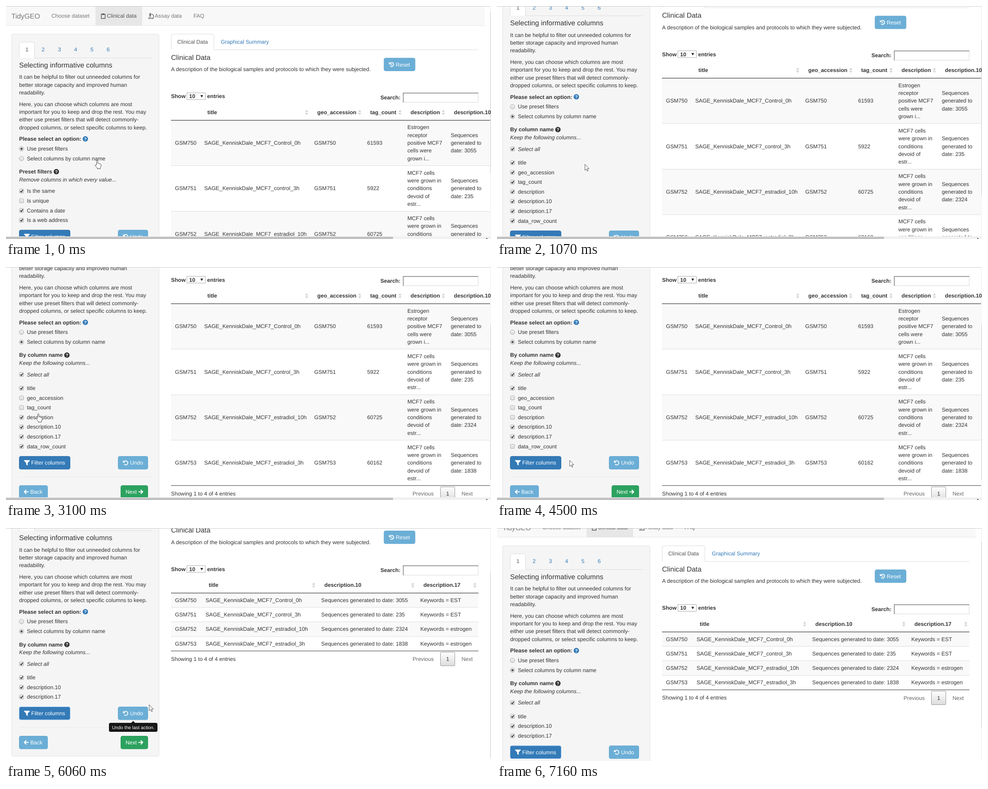
An HTML page that plays this animation: 1079x519 px, repeating every 7310 ms.

```html
<!DOCTYPE html>
<html lang="en">
<head>
<meta charset="utf-8">
<title>Selecting columns</title>
<style>
  html, body { margin: 0; width: 100%; height: 100%; overflow: hidden; background: #fff; }
  svg { display: block; }
  text { font: 12.133px "Liberation Sans", Arial, sans-serif; fill: #333; text-rendering: geometricPrecision; }
  .b { font-weight: 700; }
  .i { font-style: italic; }
  .h { font-size: 15.6px; }
  .nav { fill: #777; }
  .on { fill: #555; }
  .link { fill: #337ab7; }
  .page { fill: #666; }
  .w { fill: #fff; }
  .tip { font-size: 10.4px; fill: #fff; }
  .q { font-size: 10px; font-weight: 700; fill: #fff; text-anchor: middle; }
  .c { text-anchor: middle; }
</style>
</head>
<body>
<svg id="stage" width="1079" height="519" viewBox="0 0 1079 519">
  <defs>
    <linearGradient id="knob" x1="0" y1="0" x2="0" y2="1">
      <stop offset="0" stop-color="#f2f2f2"/><stop offset="1" stop-color="#dcdcdc"/>
    </linearGradient>
    <linearGradient id="current" x1="0" y1="0" x2="0" y2="1">
      <stop offset="0" stop-color="#fff"/><stop offset="1" stop-color="#dcdcdc"/>
    </linearGradient>
  </defs>
</svg>
<script>
const LOOP = 7310, LINE = 17.333, BLUE = '#337ab7', SKY = '#6baed6', GREEN = '#2ca25f';
const stage = document.getElementById('stage');

// ---- drawing helpers
function add(parent, tag, attrs = {}, str) {
  const node = document.createElementNS(stage.namespaceURI, tag);
  for (const key in attrs) node.setAttribute(key, attrs[key]);
  if (str) node.textContent = str;
  return parent.appendChild(node);
}
const group = (parent, x = 0, y = 0) => add(parent, 'g', { transform: `translate(${x} ${y})` });
const text = (g, x, y, str, cls = '') => add(g, 'text', { x, y, class: cls }, str);
const rect = (g, x, y, width, height, fill, more) => add(g, 'rect', { x, y, width, height, fill, ...more });
const fillPath = (g, d, fill) => add(g, 'path', { d, fill });
const strokePath = (g, d, stroke, width = 1, fill = 'none') =>
  add(g, 'path', { d, stroke, fill, 'stroke-width': width });
const show = (node, on) => node.setAttribute('visibility', on ? 'inherit' : 'hidden');
const move = (node, x, y) => node.setAttribute('transform', `translate(${x} ${y})`);

function lines(g, x, y, list, cls) {
  list.forEach((str, i) => text(g, x, y + i * LINE, str, cls));
}

const icons = {
  filter: g => fillPath(g, 'M0 0h12.5v1.5L8 6v6L4.6 9.6V6L0 1.5z', '#fff'),
  undo(g) {
    strokePath(g, 'M2.2 4A4.6 4.6 0 1 1 2.8 8.8', '#fff', 1.8);
    fillPath(g, 'M.3.3v5.2h5.2z', '#fff');
  },
  history(g) {
    icons.undo(g);
    strokePath(g, 'M6.3 3.6v3l2 1.4', '#fff', 1.3);
  },
  left: g => strokePath(g, 'M11 5.5H1.5M5.8 1L1.3 5.5l4.5 4.5', '#fff', 2),
  right: g => strokePath(g, 'M0 5.5h9.5M5.2 1l4.5 4.5L5.2 10', '#fff', 2),
};

function button(g, x, y, w, fill, label, labelX, icon, iconX) {
  const edge = { [BLUE]: '#2e6da4', [SKY]: '#62a8d2', [GREEN]: '#289857' }[fill];
  const box = rect(g, x + .5, y + .5, w - 1, 28.5, fill, { rx: 3.5, stroke: edge });
  text(g, labelX, y + 19, label, 'w');
  icons[icon](group(g, iconX, y + 9));
  return box;
}

function help(g, x, y, fill) {
  add(g, 'circle', { cx: x, cy: y, r: 6, fill });
  text(g, x, y + 3.6, '?', 'q');
}

function tab(g, x, y, w, h, end) {
  const base = y + h;
  strokePath(g, `M${x} ${base}V${y + 3.5}q0-3.5 3.5-3.5h${w - 7}q3.5 0 3.5 3.5V${base}`, '#ddd', 1, '#fff');
  strokePath(g, `M${x + w} ${base}H${end}`, '#ddd');
}

function radio(g, y, label) {
  add(g, 'circle', { cx: 34.5, cy: y, r: 5, fill: 'url(#knob)', stroke: '#a9a9a9' });
  text(g, 46.5, y + 4, label);
  return add(g, 'circle', { cx: 34.5, cy: y, r: 2.5, fill: '#555' });
}

function check(g, y, label, cls) {
  rect(g, 30, y - 4.5, 9, 9, 'url(#knob)', { rx: 1.5, stroke: '#a9a9a9' });
  text(g, 46.5, y + 4.1, label, cls);
  return strokePath(g, `M32 ${y}l2 2.3 3.6-5`, '#333', 1.8);
}

function sorter(g, x) {
  fillPath(g, `M${x - 3.5} 236h7l-3.5-5zM${x - 3.5} 238h7l-3.5 5z`, '#d3d3d3');
}

// ---- page
const page = group(stage);

rect(page, 0, 0, 1065, 43, '#f8f8f8');
rect(page, 0, 43, 1065, 1, '#e7e7e7');
rect(page, 199, 0, 104, 43, '#e7e7e7');
text(page, 12, 27.5, 'TidyGEO', 'nav h');
text(page, 101, 26.4, 'Choose dataset', 'nav');
text(page, 224.5, 26.4, 'Clinical data', 'on');
text(page, 331, 26.4, 'Assay data', 'nav');
text(page, 417, 26.4, 'FAQ', 'nav');
strokePath(page, 'M212 18.2h8.6v9.6H212z', '#555', 1.4);
fillPath(page, 'M214 17h1.2a1.2 1.2 0 0 1 2.2 0h1.2v3H214z', '#555');
fillPath(page, 'M319 16h3.5v7.5H319zM317 25h6v1.2h-6zM316 27h12.5v1.5H316z', '#777');
strokePath(page, 'M323 18.5a4 4 0 0 1 2 8.5', '#777', 1.6);

const well = rect(page, 12.5, 62.5, 328, 642, '#f5f5f5', { rx: 3.5, stroke: '#e3e3e3' });
tab(page, 29.5, 80.5, 34, 35, 324);
for (let n = 1; n <= 6; n++) text(page, 7 + n * 36.15, 101.3, n, n > 1 ? 'link' : 'on');
text(page, 29.3, 137, 'Selecting informative columns', 'h');
lines(page, 29.3, 162.3, [
  'It can be helpful to filter out unneeded columns for',
  'better storage capacity and improved human',
  'readability.']);
lines(page, 29.3, 222.7, [
  'Here, you can choose which columns are most',
  'important for you to keep and drop the rest. You may',
  'either use preset filters that will detect commonly-',
  'dropped columns, or select specific columns to keep.']);
text(page, 29.3, 300.3, 'Please select an option:', 'b');
help(page, 176.5, 296, BLUE);
const presetDot = radio(page, 318, 'Use preset filters');
const nameDot = radio(page, 339.8, 'Select columns by column name');

const presets = group(page);
text(presets, 29.3, 373.2, 'Preset filters', 'b');
help(presets, 112, 369, '#333');
text(presets, 29.3, 390.5, 'Remove columns in which every value...', 'i');
['Is the same', 'Is unique', 'Contains a date', 'Is a web address'].forEach((label, i) => {
  show(check(presets, 412.2 + i * 21.6, label), i !== 1);
});

const byName = group(page);
text(byName, 29.3, 373.2, 'By column name', 'b');
help(byName, 135.5, 369, '#333');
text(byName, 29.3, 390.5, 'Keep the following columns...', 'i');
check(byName, 412.2, 'Select all', 'i');

function columnList(labels) {
  const g = group(byName);
  return { g, ticks: labels.map((label, i) => check(g, 442.7 + i * 21.6, label)) };
}
const allColumns = columnList(['title', 'geo_accession', 'tag_count', 'description',
  'description.10', 'description.17', 'data_row_count']);
const keptColumns = columnList(['title', 'description.10', 'description.17']);

const actions = group(page);
const filterBox = button(actions, 29, 594, 114, BLUE, 'Filter columns', 56, 'filter', 40.3);
button(actions, 249, 594, 67, SKY, 'Undo', 276, 'undo', 260);
rect(actions, 29, 640, 295, 1, '#eaeaea');
button(actions, 29, 659, 64, SKY, 'Back', 54, 'left', 39.5);
button(actions, 255, 659, 61, GREEN, 'Next', 266, 'right', 294.5);

tab(page, 367.5, 62.5, 95, 35, 1051);
text(page, 381, 84.3, 'Clinical Data', 'on');
text(page, 478, 84.3, 'Graphical Summary', 'link');
text(page, 367.3, 119.8, 'Clinical Data', 'h');
text(page, 367.3, 145.3, 'A description of the biological samples and protocols to which they were subjected.');
button(page, 840.5, 115.5, 70, SKY, 'Reset', 867, 'history', 851.5);
text(page, 367.3, 205.3, 'Show', 'b');
rect(page, 402.5, 193.5, 41, 15, '#fff', { stroke: '#a9a9a9' });
text(page, 407.5, 205.3, '10', 'b');
fillPath(page, 'M432.5 198.5h6l-3 5.5z', '#222');
text(page, 447.5, 205.3, 'entries', 'b');
text(page, 833, 207.6, 'Search:', 'b');
rect(page, 883, 193, 168, 22, '#fff');
strokePath(page, 'M883.8 215V193.8H1051', '#8f8f8f', 1.7);
strokePath(page, 'M1050.5 194.5v20H884.5', '#d6d6d6');

// ---- tables
function table(end, heads, rowHeight, rows) {
  const g = group(page);
  heads.forEach(([x, label, sortX]) => {
    text(g, x, 241, label, 'b');
    if (sortX) sorter(g, sortX);
  });
  rows.forEach((cells, i) => {
    const top = 254 + i * rowHeight, mid = top + rowHeight / 2 + 4.5;
    if (i % 2 === 0) rect(g, 367, top, end - 367, rowHeight, '#f9f9f9');
    if (i) rect(g, 367, Math.round(top), end - 367, 1, '#ddd');
    cells.forEach(([x, ...list]) => lines(g, x, mid - (list.length - 1) * LINE / 2, list));
  });
  const bottom = Math.round(254 + rows.length * rowHeight);
  rect(g, 367, 254, end - 367, 1, '#111');
  rect(g, 367, bottom, end - 367, 1, '#333');
  text(g, 367.3, bottom + 22.3, 'Showing 1 to 4 of 4 entries');
  text(g, 904.5, bottom + 23, 'Previous', 'page');
  rect(g, 966.5, bottom + 3.5, 32, 30, 'url(#current)', { rx: 1.5, stroke: '#979797' });
  text(g, 982.5, bottom + 23, '1', 'c');
  text(g, 1013.5, bottom + 23, 'Next', 'page');
  return g;
}

const samples = [
  ['Control_0h', '61593', '3055', 'EST'],
  ['control_3h', '5922', '235', 'EST'],
  ['estradiol_10h', '60725', '2324', 'estrogen'],
  ['estradiol_3h', '60162', '1838', 'estrogen'],
].map(([name, tags, date, word], i) => ({
  id: 'GSM75' + i, title: 'SAGE_KenniskDale_MCF7_' + name, tags, date, word,
}));
const firstNote = ['Estrogen', 'receptor', 'positive MCF7', 'cells were', 'grown i...'];
const otherNote = ['MCF7 cells', 'were grown in', 'conditions', 'devoid of', 'estr...'];

const fullTable = table(1077,
  [[448, 'title', 669], [692.5, 'geo_accession', 787], [810.3, 'tag_count', 876.5],
   [900, 'description', 973], [996.5, 'description.10']],
  101.25,
  samples.map((s, i) => [[376, s.id], [441, s.title], [685.8, s.id], [803.5, s.tags],
    [893, ...(i ? otherNote : firstNote)],
    [989.5, 'Sequences', 'generated to', 'date: ' + s.date]]));

const keptTable = table(1051,
  [[451, 'title', 684.5], [708.3, 'description.10', 905], [928.7, 'description.17', 1043]],
  32.2,
  samples.map(s => [[376, s.id], [444, s.title],
    [701.3, 'Sequences generated to date: ' + s.date], [921.7, 'Keywords = ' + s.word]]));

const tooltip = group(page);
tooltip.setAttribute('opacity', .9);
rect(tooltip, 229, 543.6, 108, 20, '#000', { rx: 3.5 });
fillPath(tooltip, 'M278.5 543.8l4.4-4.4 4.4 4.4z', '#000');
text(tooltip, 235.8, 557.2, 'Undo the last action.', 'tip');

// ---- window frame and pointer
const track = rect(stage, 1078, 0, 1, 519, '#ececec');
const thumb = rect(stage, 1078, 0, 1, 10, '#bdbdbd');
const hbar = group(stage);
rect(hbar, 0, 513, 1079, 6, '#f1f1f1');
rect(hbar, 0, 514, 861, 5, '#c1c1c1');
fillPath(hbar, 'M1068.5 516l3.5 3h-3.5z', '#444');
rect(stage, 0, 0, 1079, 1, '#cbcbcb');

const pointer = group(stage);
const hand = strokePath(pointer, 'M-1.5 10V1.4a1.4 1.4 0 0 1 2.8 0V6.5l1-.2 1.4.9 1.3-.2 1.2 1 1.4.1.8 1V13l-1.6 3v2.5H0v-1.8L-4.8 11.6c-.6-1 .6-2 1.6-1.3z', '#333', .9, '#fff');
const arrow = strokePath(pointer, 'M-.3-.3V13L2.7 10.2 4.8 15 6.7 14.2 4.7 9.5H8.8Z', '#333', .8, '#fff');

// ---- timeline: start, end, steps, scroll, pointer x, pointer y, easing power
const moves = [
  [210, 380, 3, 0, 196, 353],
  [690, 1240, 8, 172.7, 196, 353, 1.3],
  [1400, 1627, 4, 172.7, 66, 310, .5],
  [1702, 1930, 4, 172.7, 63, 295, .7],
  [2080, 2080, 1, 172.7, 64, 295],
  [2250, 2320, 2, 172.7, 65, 286],
  [2490, 2560, 2, 172.7, 70, 308],
  [2790, 3100, 5, 172.7, 72, 327],
  [3260, 3880, 9, 172.7, 74, 395],
  [4050, 4190, 3, 172.7, 73, 395],
  [4340, 4500, 3, 172.7, 162, 431],
  [4730, 4882, 3, 210, 144, 418, .6],
  [4958, 5110, 3, 210, 128, 404],
  [5360, 5360, 1, 109.6, 128, 404],
  [5437, 5830, 6, 109.6, 301, 398],
  [6060, 6230, 3, 109.6, 354, 387],
  [6380, 6620, 4, 23, 354, 387],
  [6780, 7084, 5, 23, 996, 500],
  [7160, 7160, 1, 23, 996, 600],
];
const handTimes = [[0, 370], [1470, 4490], [4950, 5430], [5740, 6050]];
const uncheckAt = [Infinity, 2250, 2790, 3260, Infinity, Infinity, 4050];
const modes = {
  preset: { shift: -95.4, height: 696, view: 513 },
  full: { shift: 0, height: 723, view: 513 },
  kept: { shift: -86.4, height: 637, view: 526 },
};

function poseAt(t) {
  let pose = [0, 203, 344];
  for (const [start, end, steps, scroll, x, y, power = 1] of moves) {
    if (t < start) break;
    const i = steps > 1 ? Math.min(steps - 1, Math.floor((t - start) / (end - start) * (steps - 1) + .1)) : 0;
    const k = ((i + 1) / steps) ** power;
    pose = [scroll, x, y].map((to, j) => pose[j] + (to - pose[j]) * k);
  }
  return pose;
}

function draw(t) {
  const [scroll, x, y] = poseAt(t);
  const name = t < 290 ? 'preset' : t < 5360 ? 'full' : 'kept';
  const { shift, height, view } = modes[name];
  const kept = name === 'kept';

  move(page, 0, -scroll);
  move(actions, 0, shift);
  well.setAttribute('height', 642 + shift);
  show(presetDot, t < 210);
  show(nameDot, t >= 210);
  show(presets, name === 'preset');
  show(byName, name !== 'preset');
  show(allColumns.g, name === 'full');
  show(keptColumns.g, kept);
  allColumns.ticks.forEach((tick, i) => show(tick, t < uncheckAt[i]));
  show(fullTable, !kept);
  show(keptTable, kept);
  filterBox.setAttribute('stroke', t >= 5280 ? '#7db0e8' : '#2e6da4');
  show(tooltip, t >= 5745 && t < 6220);

  const run = view - 26;
  track.setAttribute('height', view);
  thumb.setAttribute('y', 13 + scroll * run / height);
  thumb.setAttribute('height', run * view / height);
  show(hbar, !kept);

  const isHand = handTimes.some(([a, b]) => t >= a && t < b);
  move(pointer, Math.round(x), Math.round(y));
  show(hand, isHand);
  show(arrow, !isHand);
}

const began = performance.now();
function tick() {
  draw((performance.now() - began) % LOOP);
  requestAnimationFrame(tick);
}
tick();
</script>
</body>
</html>
```
